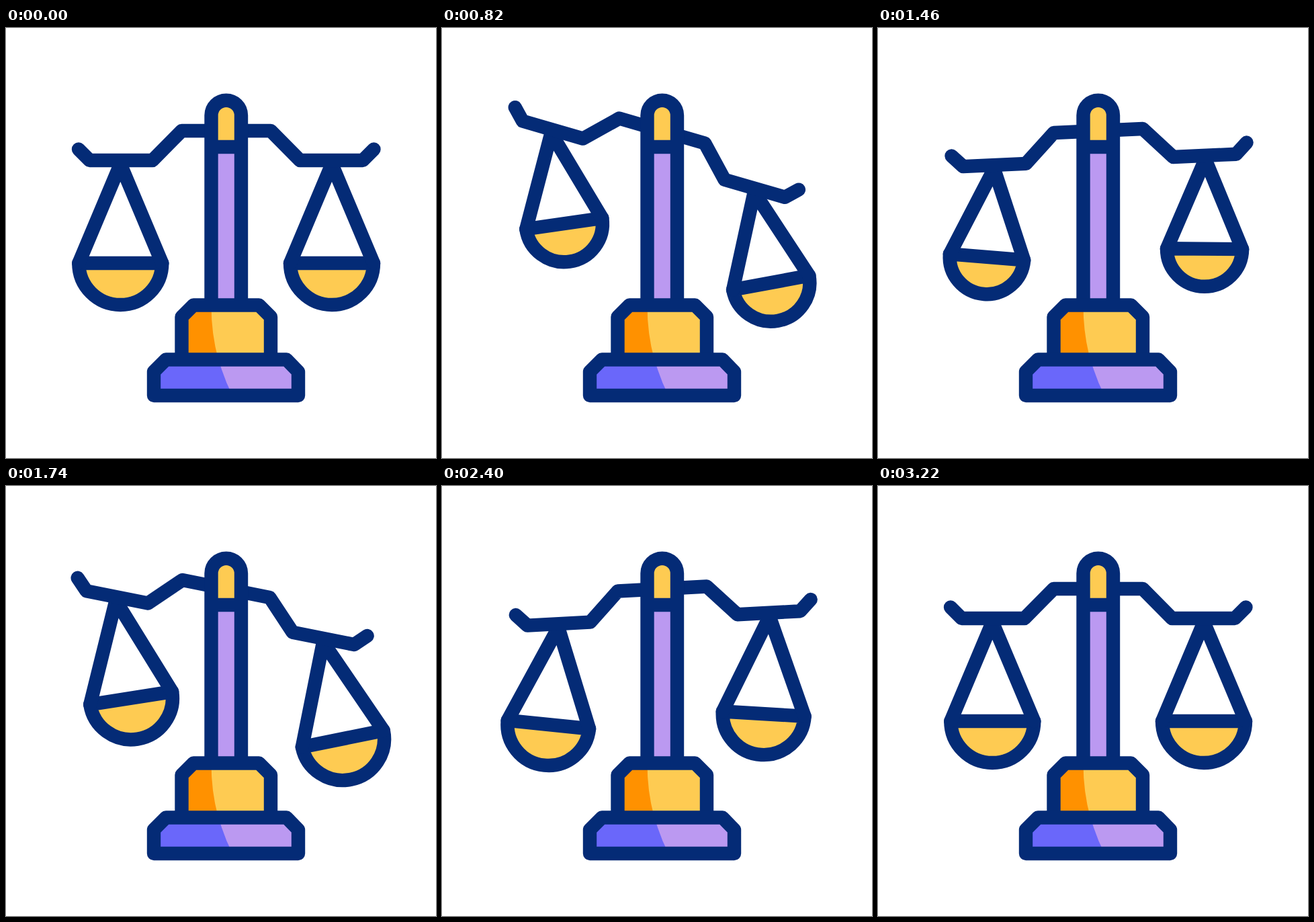
Write an HTML page that moves like this. It is 640 px wide and 640 px high and loops after 3600 ms.

```html
<!DOCTYPE html>
<html lang="en">
<head>
<meta charset="utf-8">
<title>Scales</title>
<style>
  html, body { margin: 0; width: 100%; height: 100%; overflow: hidden; background: #fff; }
  svg { display: block; }
  .line { fill: none; stroke: #042b76; stroke-width: 20.4; stroke-linecap: round; stroke-linejoin: round; }
  .pan path { vector-effect: non-scaling-stroke; }
</style>
</head>
<body>
<svg width="640" height="640" viewBox="0 0 640 640">
  <defs>
    <g id="pan" class="pan">
      <path class="line" style="fill:#fecb52" d="M-62 147.5H62A62 62 0 0 1-62 147.5Z"/>
      <path class="line" d="M-62 147.5L0 0L62 147.5"/>
    </g>
  </defs>
  <g id="beam">
    <use id="left" href="#pan"/>
    <use id="right" href="#pan"/>
    <path class="line" d="M108 180.5L124.5 197H218L261.5 153H394L437.5 197H531L547.5 180.5"/>
  </g>
  <path fill="#bb99f1" d="M305.5 177H350V413H305.5Z"/>
  <path fill="#fecb52" d="M305.5 177V130a22.25 22.25 0 0 1 44.5 0V177Z"/>
  <path class="line" d="M305.5 413V130a22.25 22.25 0 0 1 44.5 0V413M305.5 177H350"/>
  <path fill="#fecb52" d="M261.5 493.5V430L279 412.5H376.5L394 430V493.5Z"/>
  <path fill="#ff9100" d="M261.5 493.5V430L279 412.5H305.5Q305.5 455 316 493.5Z"/>
  <path class="line" d="M261.5 493.5V430L279 412.5H376.5L394 430V493.5"/>
  <path fill="#bb99f1" d="M220 547V511.5L238 493.5H417.5L435 511.5V547Z"/>
  <path fill="#6a67fa" d="M220 547V511.5L238 493.5H316.5Q324 521 337 547Z"/>
  <path class="line" d="M220 547V511.5L238 493.5H417.5L435 511.5V547Z"/>
</svg>
<script>
  const LOOP = 3600, START = 221, STEP = 500;
  // Angles in degrees at each STEP; the pans are measured against the beam.
  const beamKeys = [0, 19.8, -15, 11.4, -5.1, 2, 0];
  const leftKeys = [0, -33, 32.6, -21, 16, -6, 0];
  const rightKeys = [0, -35, 27, -23.6, 13.5, -8.2, 0];

  const get = id => document.getElementById(id);
  const beam = get('beam'), left = get('left'), right = get('right');
  const rad = deg => deg * Math.PI / 180;
  const mix = (a, b, u) => a + (b - a) * u;
  const smooth = x => x * x * (3 - 2 * x);

  function swingEase(x, i) {
    if (i === 0) return x ** 1.2;
    if (i === 5) return 1 - (1 - x) ** 1.2;
    return (x + smooth(x)) / 2;
  }

  // Outline points travel in straight lines, so a pan shrinks a little in mid-swing.
  function setPan(el, x, keys, i, u) {
    const a = rad(keys[i]), b = rad(keys[i + 1]);
    const c = mix(Math.cos(a), Math.cos(b), u);
    const s = mix(Math.sin(a), Math.sin(b), u);
    el.setAttribute('transform', `matrix(${c} ${s} ${-s} ${c} ${x} 202.5)`);
  }

  function draw(now) {
    const p = Math.min(Math.max((now % LOOP - START) / STEP, 0), 6);
    const i = Math.min(Math.floor(p), 5), x = p - i;
    const angle = mix(beamKeys[i], beamKeys[i + 1], smooth(x));
    const u = swingEase(x, i);
    beam.setAttribute('transform', `rotate(${angle} 327.75 152)`);
    setPan(left, 170.3, leftKeys, i, u);
    setPan(right, 485, rightKeys, i, u);
  }

  const begin = performance.now();
  function tick() {
    draw(performance.now() - begin);
    requestAnimationFrame(tick);
  }
  tick();
</script>
</body>
</html>
```
